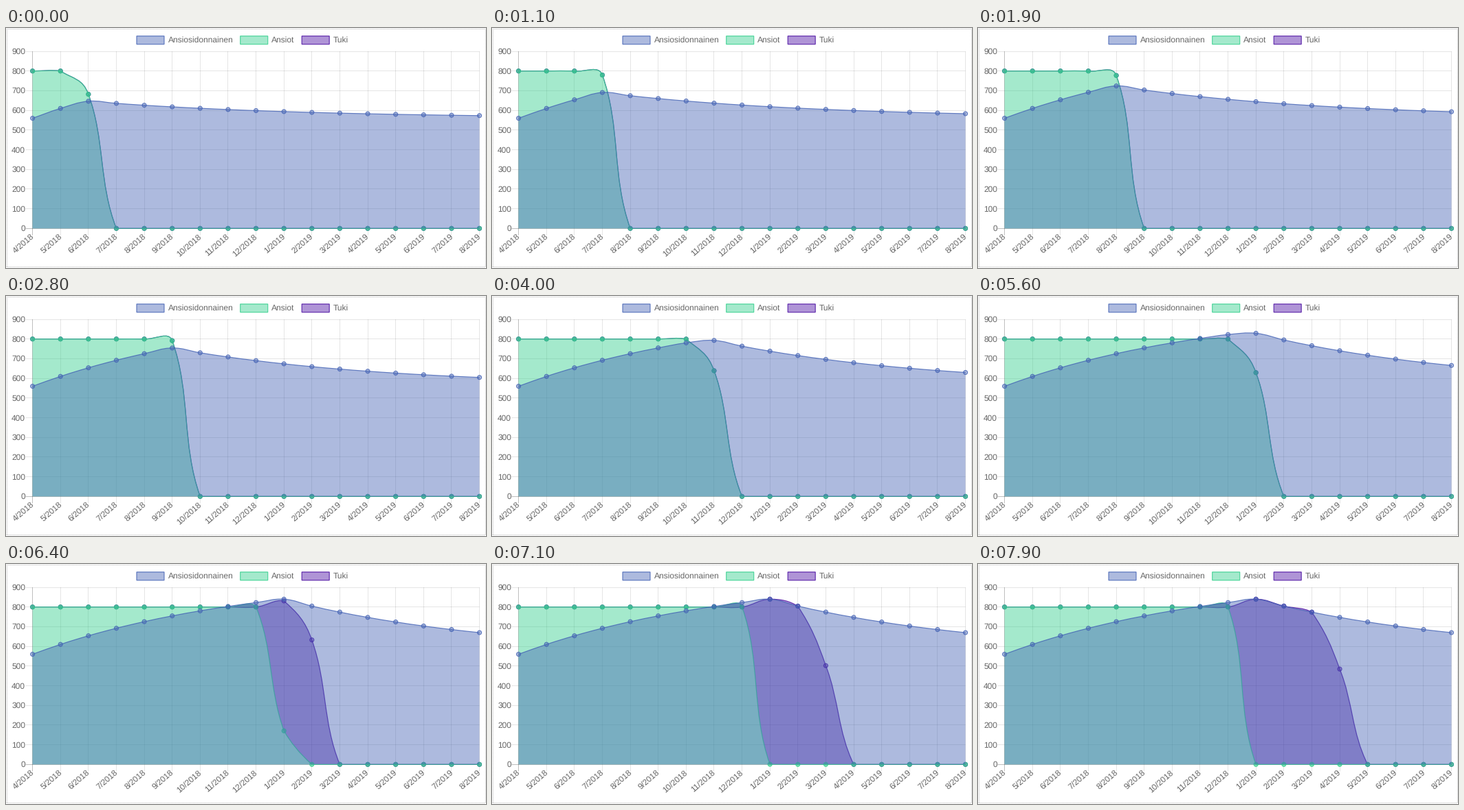
A matplotlib script that plays this animation: 698x350 px, repeating every 8 s.

```python
import numpy as np
import matplotlib.pyplot as plt
from matplotlib.animation import FuncAnimation
from matplotlib.patches import PathPatch, Rectangle
from matplotlib.path import Path

W, H, DPI = 698, 350, 64
PT = 72 / DPI                      # points per pixel
LEFT, RIGHT, TOP, BOTTOM = 38.6, 688.5, 34.0, 292.3
N, Y_MAX = 17, 900
FRAMES, STEP = 80, 100
TENSION = 0.4
TILT = 41                          # month labels, degrees
LAST_WORK = 9                      # earnings move no further than this month
# When each update starts, in seconds; the first one moves the end to month 2.
STARTS = [-0.38, 0.5, 1.31, 2.12, 2.9, 3.67, 4.47, 5.28, 6.08, 6.87, 7.67]

BLUE, GREEN, PURPLE = (66, 97, 180), (46, 206, 138), (70, 8, 160)
XS = np.linspace(LEFT, RIGHT, N)

plt.rcParams["font.family"] = "Liberation Sans"
plt.rcParams["text.hinting"] = "none"


def rgba(color, alpha):
    return tuple(c / 255 for c in color) + (alpha,)


def to_y(value):
    return BOTTOM - value / Y_MAX * (BOTTOM - TOP)


def targets(end):
    """Values of benefit, earnings and support when work ends at month `end`."""
    months = np.arange(N)
    benefit = [560.0]
    for i in range(1, N):
        goal = 960 if i <= min(end, LAST_WORK) else 560
        benefit.append(benefit[-1] + (goal - benefit[-1]) / 8)
    benefit = np.array(benefit)
    worked = end if end <= LAST_WORK else LAST_WORK - 1
    earnings = np.where(months <= worked, 800.0, 0.0)
    supported = (months > worked) & (months <= end)
    return benefit, earnings, np.where(supported, benefit, earnings)


def spline(values):
    """Rows of (control before, point, control after) in pixels."""
    p = np.column_stack([XS, to_y(values)])
    before = np.vstack([p[:1], p[:-1]])
    after = np.vstack([p[1:], p[-1:]])
    d0 = np.hypot(*(p - before).T)
    d1 = np.hypot(*(after - p).T)
    k = (TENSION / (d0 + d1))[:, None]
    span = after - before
    c0 = p - k * d0[:, None] * span
    c1 = p + k * d1[:, None] * span
    for c in (c0, c1):
        c[:, 0] = c[:, 0].clip(LEFT, RIGHT)
        c[:, 1] = c[:, 1].clip(TOP, BOTTOM)
    return np.stack([c0, p, c1], axis=1)


def model(end):
    return np.array([spline(v) for v in targets(end)])


MODELS = [model(end) for end in range(1, len(STARTS) + 2)]


def ease(t):
    return 1 - (1 - min(t, 1)) ** 4


def view(t):
    state = MODELS[0]
    ends = STARTS[1:] + [np.inf]
    for start, stop, goal in zip(STARTS, ends, MODELS[1:]):
        if t < start:
            break
        state = state + (goal - state) * ease(min(t, stop) - start)
    return state


def curve(nodes):
    verts = nodes.reshape(-1, 2)[1:-1]
    return verts, [Path.MOVETO] + [Path.CURVE4] * (len(verts) - 1)


def area(nodes, base=None):
    """Closed shape between a curve and another curve, or the zero line."""
    verts, codes = curve(nodes)
    if base is None:
        back = np.array([[RIGHT, BOTTOM], [LEFT, BOTTOM]])
        more = [Path.LINETO] * 2
    else:
        back, more = curve(base)
        back, more = back[::-1], [Path.LINETO] + more[1:]
    verts = np.vstack([verts, back, verts[:1]])
    return Path(verts, codes + more + [Path.CLOSEPOLY])


def circles(points, radius=3):
    return Path.make_compound_path(*[Path.circle(p, radius) for p in points])


fig = plt.figure(figsize=(W / DPI, H / DPI), dpi=DPI, facecolor="white")
ax = fig.add_axes([0, 0, 1, 1])
ax.set_xlim(0, W)
ax.set_ylim(H, 0)
ax.axis("off")


def crisp(v):
    return np.floor(v) + 0.5


def rule(xs, ys, alpha):
    ax.plot(xs, ys, color=(0, 0, 0, alpha), lw=PT, zorder=1,
            solid_capstyle="butt", snap=False)


def label(x, y, text, **kw):
    ax.text(x, y, text, size=12 * PT, color="#666666", va="baseline", **kw)


def draw_frame():
    box = dict(color="#b8b8b8", lw=PT, dashes=(1, 1), dash_capstyle="butt",
               snap=False)
    for y in (1.5, 348.5):
        ax.plot([1, 697], [y, y], **box)
    for x in (1.5, 697.5):
        ax.plot([x, x], [1, 349], **box)


def draw_grid():
    for value in range(0, Y_MAX + 1, 100):
        y = to_y(value)
        rule([LEFT - 10, RIGHT], [crisp(y)] * 2, 0.1 if value else 0.25)
        label(LEFT - 10.5, y + 3.9, str(value), ha="right")
    angle = np.radians(TILT)
    for i, x in enumerate(XS):
        rule([crisp(x)] * 2, [TOP, BOTTOM + 10], 0.1 if i else 0.25)
        year, month = divmod(i + 3, 12)
        label(x + 4 * np.sin(angle), BOTTOM + 10 + 4 * np.cos(angle),
              f"{month + 1}/{2018 + year}", ha="right",
              rotation=TILT, rotation_mode="anchor")


def draw_legend():
    entries = [(190, "Ansiosidonnainen", BLUE), (340.7, "Ansiot", GREEN),
               (430.2, "Tuki", PURPLE)]
    for x, text, color in entries:
        ax.add_patch(Rectangle((x, 11.7), 40, 12, fc=rgba(color, 0.43),
                               ec=rgba(color, 0.8), lw=1.2 * PT, snap=False))
        label(x + 45.7, 21.2, text)


class Series:
    def __init__(self, color, z, dot_alpha=0.43):
        edge = rgba(color, 0.8)
        self.fill = self.shape(z, fc=rgba(color, 0.43), lw=0)
        self.line = self.shape(z + 0.1, fill=False, ec=edge, lw=1.2 * PT,
                               capstyle="butt")
        self.dots = self.shape(z + 0.2, fc=rgba(color, dot_alpha), ec=edge,
                               lw=1.1 * PT)

    @staticmethod
    def shape(z, **style):
        return ax.add_patch(PathPatch(Path([[0, 0]]), zorder=z, snap=False,
                                      **style))

    def update(self, nodes, base=None):
        self.fill.set_path(area(nodes, base))
        self.line.set_path(Path(*curve(nodes)))
        self.dots.set_path(circles(nodes[:, 1]))


draw_frame()
draw_grid()
draw_legend()
support = Series(PURPLE, 3)
earnings = Series(GREEN, 4, 0.6)
benefit = Series(BLUE, 5)


def update(frame):
    b, e, s = view(frame * STEP / 1000)
    support.update(s, e)
    earnings.update(e)
    benefit.update(b)
    return []


anim = FuncAnimation(fig, update, frames=FRAMES, interval=STEP,
                     repeat=True, repeat_delay=0)
plt.show()
```
